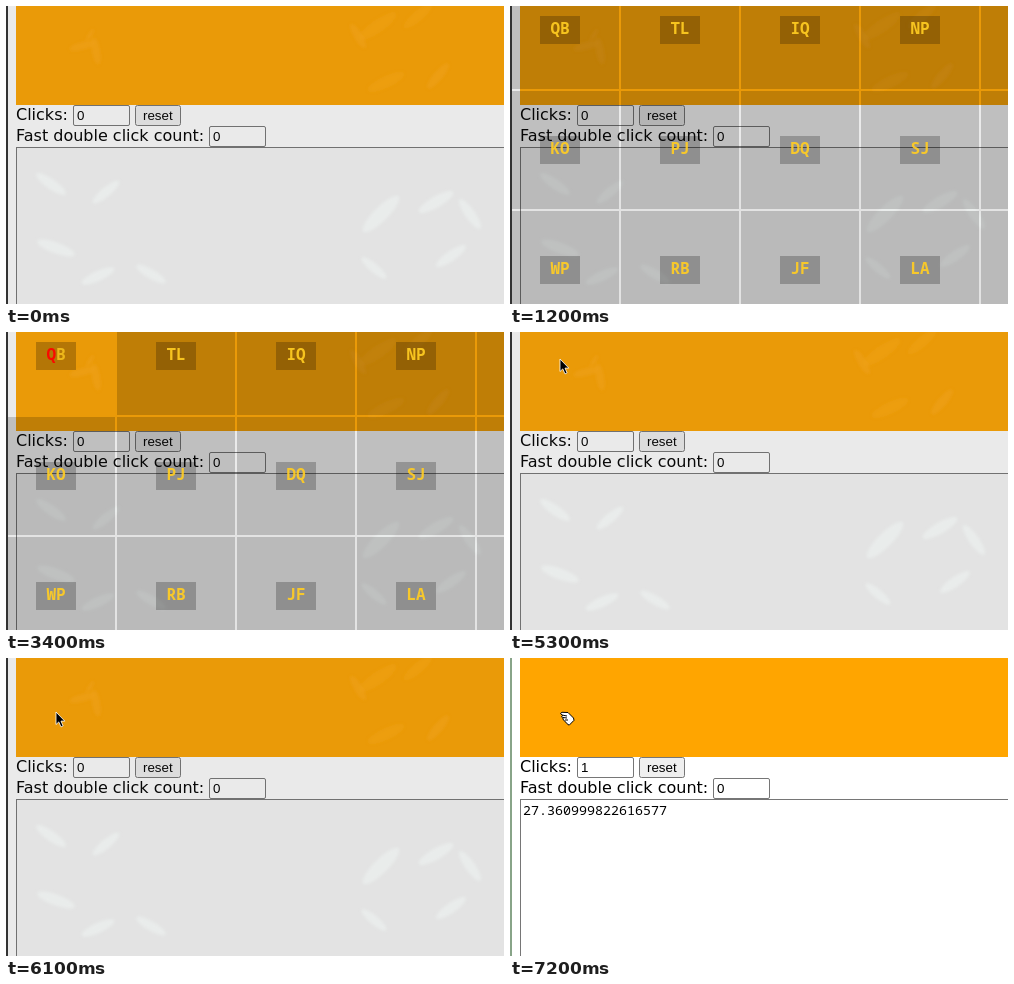
Animation, 498 px wide and 298 px high, one loop 8000 ms. Source, as an HTML page:

```html
<!DOCTYPE html>
<html lang="en">
<head>
<meta charset="utf-8">
<style>
html, body { margin: 0; height: 100%; overflow: hidden; background: #fff; }
svg { display: block; width: 498px; height: 298px; }
.page { font: 16px "DejaVu Sans", sans-serif; }
.field { fill: #fff; stroke: #767676; }
.ui { font: 13.333px "Liberation Sans", Arial, sans-serif; }
.log { font: 13.333px "Noto Sans Mono", monospace; }
.hint { font: bold 16px "Noto Sans Mono", monospace; fill: #fc2; fill-opacity: .92; }
</style>
</head>
<body>
<svg viewBox="0 0 498 298">
  <defs><filter id="soft"><feGaussianBlur stdDeviation="1.6"/></filter></defs>

  <g class="page">
    <rect id="margin" x="2" width="8" height="298" fill="#f4f6f4"/>
    <rect x="10" width="488" height="99" fill="#ffa500"/>
    <text x="10" y="114">Clicks:</text>
    <text x="10" y="135">Fast double click count:</text>
    <rect class="field" x="67.5" y="99.5" width="56" height="20" rx="1.5"/>
    <rect class="field" x="203.5" y="120.5" width="56" height="20" rx="1.5"/>
    <rect class="field" x="129.5" y="99.5" width="45" height="20" rx="2" style="fill:#efefef"/>
    <rect class="field" x="10.5" y="141.5" width="500" height="200"/>
    <g class="ui">
      <text id="clicks" x="71" y="114">0</text>
      <text x="207" y="135">0</text>
      <text x="137" y="114">reset</text>
    </g>
    <text id="log" class="log" x="13" y="157">27.360999822616577</text>
  </g>

  <g id="veil">
    <rect width="498" height="298" fill="#464846" fill-opacity=".114"/>
    <rect x="11" y="142" width="487" height="156" fill="#203028" fill-opacity=".035"/>
    <g id="leaves" filter="url(#soft)"></g>
  </g>
  <rect id="edge" width="2" height="298"/>

  <g id="grid"></g>

  <path id="arrow" d="M.5 .5V13L3.3 10.4 5.5 15.4 7.6 14.4 5.5 9.6H9.3Z" stroke="#fff" stroke-width=".8"/>
  <g id="hand" stroke="#000" stroke-linejoin="round">
    <path d="M50.5 55.5L52 54.3 58 54.5 63.5 60 64 62.3 59.2 67.2 56.6 65.4 55.3 63.5 53.3 62 53 60.2 51.6 59 52.5 57.4Z" fill="#fff"/>
    <path d="M52 57L57 58M53 59.5L57 60M55 62L58 62" fill="none"/>
  </g>
</svg>
<script>
const LOOP = 8000, CELL = 120;
const $ = id => document.getElementById(id);
const show = (id, on) => $(id).style.display = on ? "" : "none";

function add(parent, tag, attrs, text = "") {
  const el = document.createElementNS("http://www.w3.org/2000/svg", tag);
  for (const k in attrs) el.setAttribute(k, attrs[k]);
  el.textContent = text;
  return parent.appendChild(el);
}

// Faint foliage behind the window: x, y, length, angle
[[76, 40, 13, -15], [90, 45, 14, 80], [84, 29, 7, -60], [372, 20, 22, -35], [380, 76, 20, -25],
 [352, 30, 14, 60], [432, 70, 16, -50], [412, 10, 18, -40],
 [45, 178, 18, 35], [100, 186, 17, -40], [50, 242, 20, 20], [92, 270, 18, -25], [145, 268, 17, 30],
 [375, 208, 25, -45], [368, 262, 16, 40], [430, 196, 20, -30], [464, 208, 18, 55], [445, 250, 18, -35]
].forEach(([x, y, r, a]) => add($("leaves"), "ellipse", {
  rx: r, ry: r / 3.5, transform: `translate(${x} ${y}) rotate(${a})`,
  fill: y < 95 ? "#f3a82a" : "#f0f6f3", "fill-opacity": y < 95 ? .28 : .5
}));

const hints = ["QB TL IQ NP", "KO PJ DQ SJ", "WP RB JF LA"].map(row => row.split(" "));
let firstShade, firstText;
for (let r = 0; r < 3; r++) for (let c = 0; c < 5; c++) {
  const x = c * CELL - 9, y = r * CELL - 35, left = Math.max(x, 2);
  const shade = add($("grid"), "rect", {
    x: left, y, width: x + 118 - left, height: 118, "fill-opacity": .18
  });
  const label = hints[r][c];
  if (!label) continue;
  add($("grid"), "rect", { x: x + 39, y: y + 45, width: 40, height: 28, "fill-opacity": .23 });
  const text = add($("grid"), "text", { class: "hint", x: x + 49.4, y: y + 63 }, label);
  firstShade ??= shade;
  firstText ??= text;
}
firstText.textContent = "";
const typed = add(firstText, "tspan", {}, "Q");
const rest = add(firstText, "tspan", {}, "B");

function draw(t) {
  const grid = t >= 1100 && t < 4000, picked = t >= 3400, clicked = t >= 7100;
  show("veil", !clicked);
  show("margin", t < 7200);
  $("margin").style.fill = clicked ? "" : "#fff";
  $("edge").style.fill = t < 7100 ? "#333" : t < 7200 ? "#6b806b" : "#88a488";

  show("grid", grid);
  $("grid").style.opacity = t < 1200 ? .9 : 1;
  firstShade.style.display = picked ? "none" : "";
  typed.style.fill = picked ? "#f00" : "";
  rest.style.fillOpacity = picked ? .75 : "";

  const step = Math.min(9, Math.max(0, Math.floor((t - 5200) / 100)));
  show("arrow", t >= 4000 && !clicked);
  $("arrow").setAttribute("transform", `translate(49.5 ${23.5 + Math.round(step * 30 / 9)})`);
  show("hand", clicked);
  show("log", clicked);
  $("clicks").textContent = clicked ? 1 : 0;
}

const start = performance.now();
function tick() {
  draw((performance.now() - start) % LOOP);
  requestAnimationFrame(tick);
}
tick();
</script>
</body>
</html>
```
